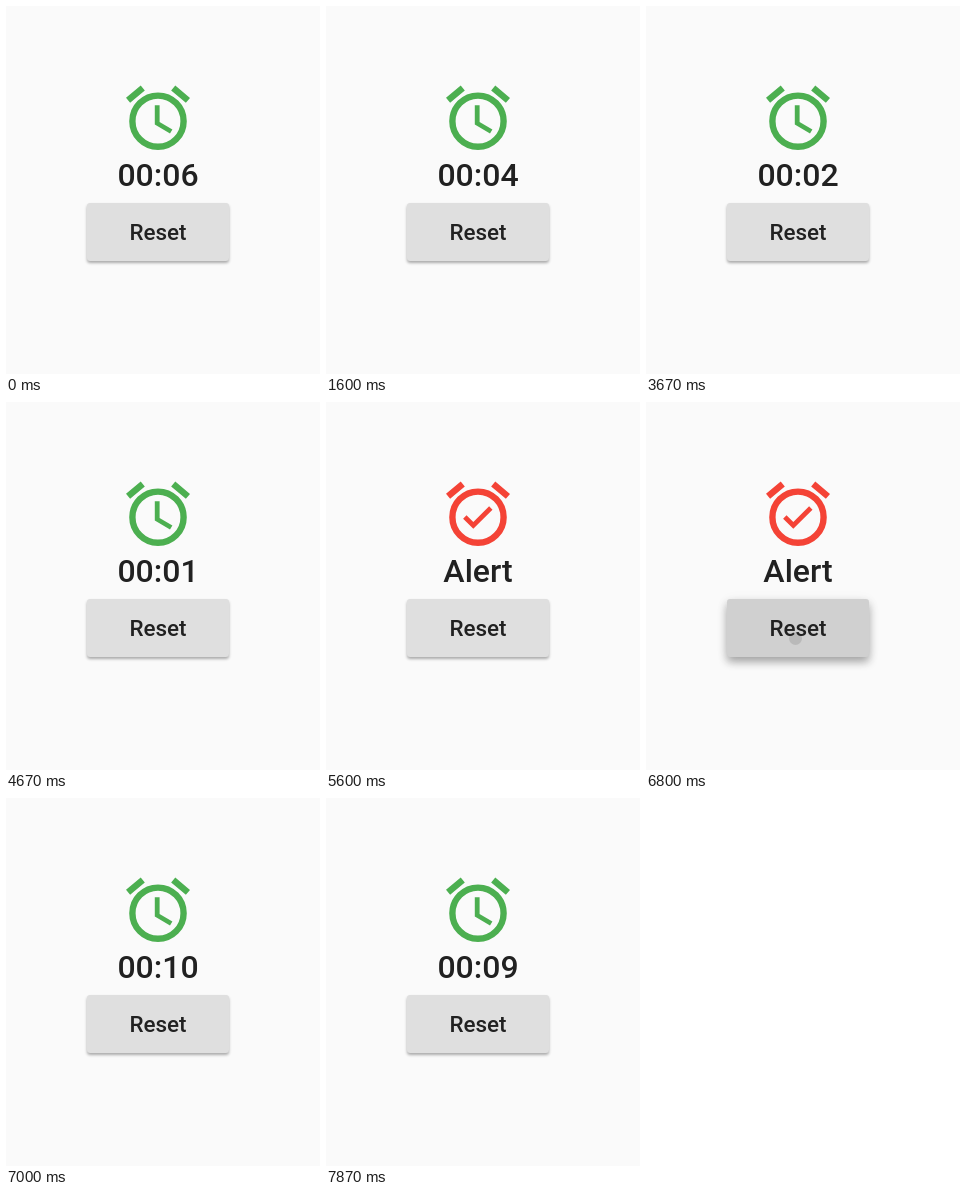
Recreate the animation shown at these times as an HTML page. Size 314x368 px, loop 8 s.

```html
<!DOCTYPE html>
<html lang="en">
<head>
<meta charset="utf-8">
<title>Countdown</title>
<style>
  html, body { margin: 0; width: 100%; height: 100%; overflow: hidden; background: #fafafa; }
  svg, .button { position: absolute; }
  svg { left: 0; top: 0; }
  text { font-family: Roboto, sans-serif; font-weight: 500; text-anchor: middle; fill: #212121; }
  .button {
    left: 81.2px; top: 197px; width: 141.6px; height: 57.6px;
    border-radius: 3.2px; overflow: hidden;
  }
  .splash { position: absolute; border-radius: 50%; background: #000; }
</style>
</head>
<body>
<div class="button" id="button"><div class="splash" id="splash"></div></div>
<svg width="314" height="368" viewBox="0 0 314 368">
  <g id="icon" transform="translate(113.6 73.6) scale(3.2)">
    <circle cx="12" cy="13" r="8" fill="none" stroke="currentColor" stroke-width="2"/>
    <g fill="currentColor">
      <path d="M22 5.72l-4.6-3.86-1.29 1.53 4.6 3.86zM7.88 3.39L6.6 1.86 2 5.71l1.29 1.53z"/>
      <path id="face"/>
    </g>
  </g>
  <text id="label" x="152" y="180.3" font-size="32"></text>
  <text x="152" y="234.3" font-size="22.4">Reset</text>
</svg>
<script>
  const LOOP = 8000;
  const HANDS = 'M12.5 8H11v6l4.75 2.85.75-1.23-4-2.37z';
  const CHECK = 'M10.54 14.53L8.41 12.4l-1.06 1.06 3.18 3.18 6-6-1.06-1.06z';

  const labels = [
    [0, '00:06'], [600, '00:05'], [1600, '00:04'], [2600, '00:03'], [3670, '00:02'],
    [4670, '00:01'], [5600, 'Alert'], [6870, '00:10'], [7870, '00:09']
  ];

  // Press: highlight and lift run 0..1; the splash has a radius, centre and opacity.
  const idle = { press: 0, r: 0, x: 0, y: 0, alpha: 0 };
  const presses = [
    [0, idle],
    [6730, { ...idle, press: 0.5 }],
    [6800, { press: 1, r: 6.5, x: 68, y: 39, alpha: 0.11 }],
    [6870, { press: 1, r: 60, x: 70, y: 32, alpha: 0.1 }],
    [6930, { press: 1, r: 100, x: 71, y: 29, alpha: 0.06 }],
    [7000, idle]
  ];

  const $ = id => document.getElementById(id);
  const [button, splash, icon, face, label] = ['button', 'splash', 'icon', 'face', 'label'].map($);
  const at = (steps, t) => steps.findLast(([start]) => start <= t)[1];
  const mix = (a, b, k) => a + (b - a) * k;

  function drawPress({ press, r, x, y, alpha }) {
    const grey = mix(223, 208, press);
    button.style.background = `rgb(${grey}, ${grey}, ${grey})`;
    button.style.boxShadow =
      `0 ${mix(2, 5, press)}px ${mix(3, 8, press)}px rgba(0, 0, 0, .32), ` +
      `0 2px 14px rgba(0, 0, 0, ${0.06 * press})`;
    Object.assign(splash.style, {
      left: `${x - r}px`, top: `${y - r}px`,
      width: `${2 * r}px`, height: `${2 * r}px`, opacity: alpha
    });
  }

  function draw(t) {
    const text = at(labels, t);
    const alert = text === 'Alert';
    label.textContent = text;
    icon.style.color = alert ? '#f44336' : '#4caf50';
    face.setAttribute('d', alert ? CHECK : HANDS);
    drawPress(at(presses, t));
  }

  const start = performance.now();
  function tick() {
    draw((performance.now() - start) % LOOP);
    requestAnimationFrame(tick);
  }
  tick();
</script>
</body>
</html>
```
